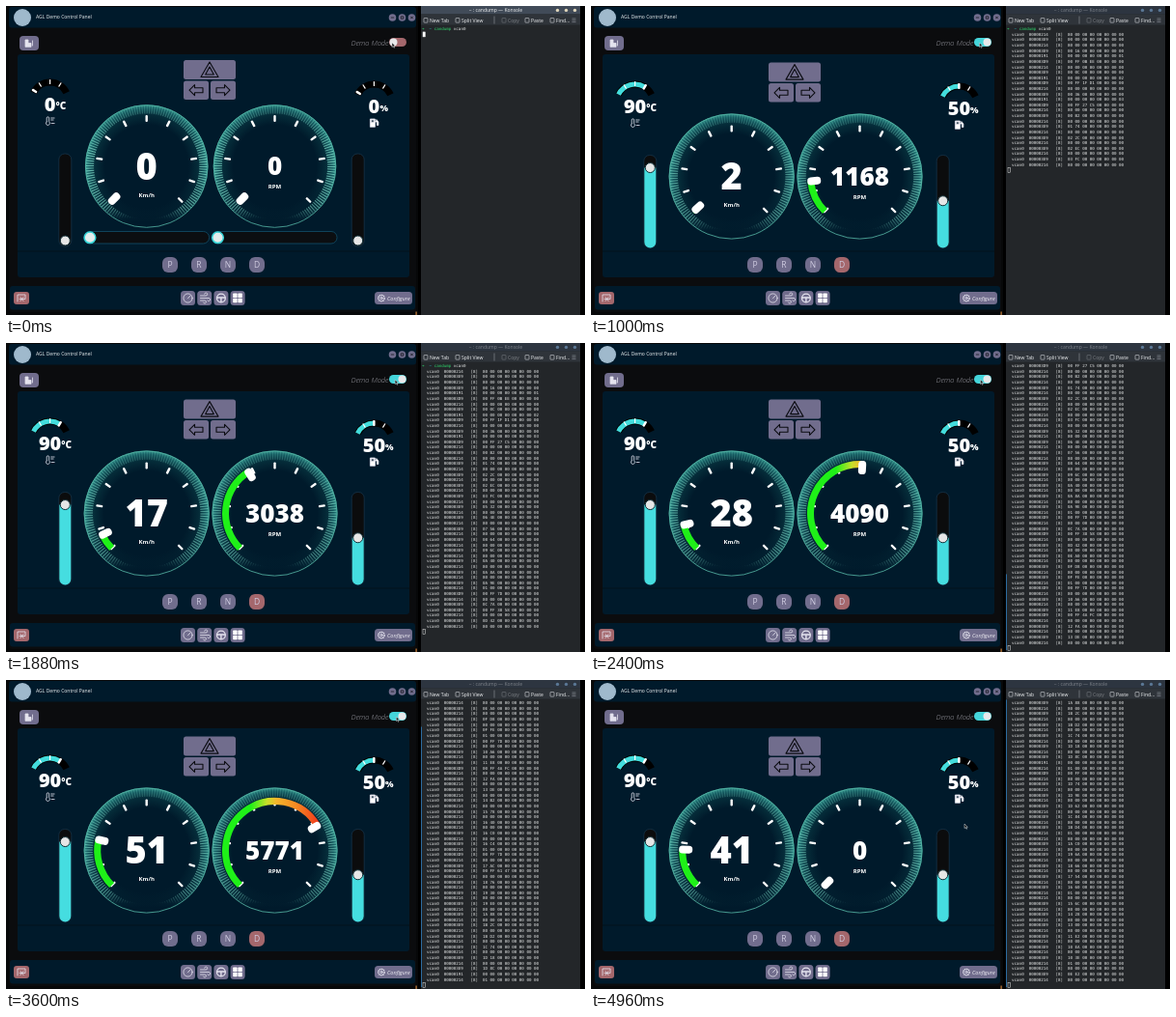
These frames come from a looping animation (600x320 px, 5 s). An HTML page:

```html
<!DOCTYPE html>
<html lang="en">
<head>
<meta charset="utf-8">
<title>Control panel and CAN dump</title>
<style>
html, body { margin: 0; width: 100%; height: 100%; overflow: hidden; background: #000; }
svg { display: block; width: 600px; height: 320px; font-family: "Open Sans", "Noto Sans", sans-serif; }
.btn { fill: #716d8d; }
.red { fill: #a4676c; }
.ink { fill: none; stroke: #0b0c12; stroke-width: 1.1; stroke-linejoin: round; }
.pale { fill: none; stroke: #e4e3ee; stroke-width: .8; stroke-linejoin: round; stroke-linecap: round; }
.num { fill: #fff; font-weight: 800; }
.mid { text-anchor: middle; }
.bar { font: 5px "Noto Sans", sans-serif; fill: #e6e8ea; }
.term { font: 4.2px "DejaVu Sans Mono", monospace; fill: #e4e6e6; white-space: pre; }
</style>
</head>
<body>
<svg id="stage" viewBox="0 0 600 320" xmlns="http://www.w3.org/2000/svg"></svg>
<script>
const LOOP = 5000, STEP = 40, START = 80;
const ROWS = 53, PITCH = 5.615, SWEEP = 270, FROM = 135;
const NAVY = "#001a2b";

// Keyframes: [ms, value], linear in between
const TRACKS = {
  lines: [[40, 0], [1000, 25], [1880, 48], [2400, 65], [3160, 86], [4080, 114], [4960, 138]],
  speed: [[500, 0], [1000, 2], [1400, 7], [1880, 17], [2400, 28], [3160, 43], [3700, 53],
          [4080, 55], [4250, 55], [4450, 52.5], [4960, 41]],
  rpm: [[440, 0], [1000, 1168], [1880, 3038], [2400, 4090], [3160, 5129], [3620, 5800], [4080, 2927], [4600, 0]],
  temp: [[80, 0], [480, 90]],
  fuel: [[80, 0], [480, 50]],
  mouseX: [[0, 400], [320, 402], [4400, 405], [4800, 387]],
  mouseY: [[0, 38], [320, 38], [4400, 38], [4800, 149]]
};

function at(name, t) {
  const k = TRACKS[name];
  if (t <= k[0][0]) return k[0][1];
  for (let i = 1; i < k.length; i++) {
    const [a, u] = k[i - 1], [b, v] = k[i];
    if (t <= b) return u + (v - u) * (t - a) / (b - a);
  }
  return k[k.length - 1][1];
}

// Bus log: plain = speed, g = gear, r = engine speed, x = indicator flag
const LOG = `0000 0016 g01 r0BEE 000C g02 r1FD1 0036 g03 r27C5 00B2 0174 022C 02EC 03FC 0532 064E 0756
  0864 096C 0A40 0A8A 0A9E x r7D00 0C7A r3858 0D42 0EA0 0FD8 0FFE x r7D00 10A6 11E8 r4AFC 12FA 13DE
  14B2 1578 1640 16C0 16C4 x r7D00 17AC r6147 1876 1930 19E0 1A88 1B2C 1BD2 1C74 1D18 1D8C g00 x r0000
  1D74 1D9E 1D62 1C84 1BD4 x 1AC0 196A 1866 1754 1660 x 156C 1428 1300 11E2 10EA 103E x 0EE2`;

function frame(id, hex) {
  return `  vcan0  00000${id}   [8]  ${hex.padEnd(16, "0").match(/../g).join(" ")}`;
}
const log = [];
for (const word of LOG.split(/\s+/)) {
  const rest = word.slice(1);
  if (word === "x") log.push(frame("214", "01"));
  else if (word[0] === "g") log.push(frame("191", rest.padStart(16, "0")));
  else if (word[0] === "r") log.push(frame("3D9", "00FF" + rest));
  else log.push(frame("214", "80"), frame("3E9", word));
}
log.push(frame("214", "80"));

// Markup helpers
const rect = (x, y, w, h, r, attrs) => `<rect x="${x}" y="${y}" width="${w}" height="${h}" rx="${r}" ${attrs}/>`;
const circle = (x, y, r, attrs) => `<circle cx="${x}" cy="${y}" r="${r}" ${attrs}/>`;
const path = (d, attrs) => `<path d="${d}" ${attrs}/>`;
const text = (x, y, s, attrs) => `<text x="${x}" y="${y}" ${attrs}>${s}</text>`;
const group = (attrs, ...kids) => `<g ${attrs}>${kids.join("")}</g>`;
const times = (n, fn) => Array.from({ length: n }, (_, i) => fn(i)).join("");

function arc(r, a, b) {
  const p = d => [r * Math.cos(d * Math.PI / 180), r * Math.sin(d * Math.PI / 180)].map(v => v.toFixed(2)).join(" ");
  return `M${p(a)}A${r} ${r} 0 ${b - a > 180 ? 1 : 0} 1 ${p(b)}`;
}

function dial(id, size, unit, unitY) {
  return group(`id="${id}"`,
    group(`class="ring"`,
      circle(0, 0, 65, `fill="url(#glow)"`),
      circle(0, 0, 65.5, `fill="url(#fade)"`),
      circle(0, 0, 60, `class="teeth" fill="none" stroke="url(#teeth)" stroke-width="8.5" pathLength="360" stroke-dasharray="1 1.5"`),
      circle(0, 0, 64.6, `fill="none" stroke="#58b8a8" stroke-width=".8"`)),
    times(11, i => rect(46, -1.2, 7, 2.4, 1, `fill="#fff" transform="rotate(${FROM + i * SWEEP / 10})"`)),
    path("", `class="arc" fill="none" stroke="url(#heat)" stroke-width="7"`),
    rect(40.5, -4, 14, 8, 3.6, `class="hand" fill="#fff"`),
    text(0, size * .36, "0", `class="num mid val" font-size="${size}"`),
    text(0, unitY, unit, `class="num mid" font-size="6" style="font-weight:700"`));
}

function gauge(id, unit, unitSize, icon) {
  return group(`id="${id}"`,
    path(arc(19, 206, 334), `fill="none" stroke="#000" stroke-width="7"`),
    path("", `class="arc" fill="none" stroke="#43dcdc" stroke-width="5"`),
    times(3, i => rect(17, -.6, 5, 1.2, .5, `fill="#fff" transform="rotate(${238 + i * 32})"`)),
    rect(16, -1.2, 6, 2.4, 1, `class="hand" fill="#fff"`),
    text(0, 11, "0", `class="num mid val" font-size="20"`),
    text(0, 8.6, unit, `class="num unit" font-size="${unitSize}"`),
    path(icon, `class="pale" transform="translate(0,21)"`));
}

const vertical = (id, x) => group(`id="${id}"`,
  rect(x - 6.5, 0, 13, 96, 6, `fill="#0b0c0d" stroke="#17344a" stroke-width=".8"`),
  path("", `class="fill" fill="#45dde0"`),
  circle(x, 0, 5, `class="knob" fill="#e6e6e6" stroke="#123038" stroke-width="1"`));

const horizontal = x => rect(x, 233.5, 130, 12.5, 6, `fill="#0b0e11" stroke="#12506a" stroke-width=".8"`) +
  circle(x + 6.5, 239.8, 5.8, `fill="#e2ecec" stroke="#35d5d8" stroke-width="1.5"`);

const gear = (c, i) => rect(162 + i * 30, 260, 16, 16, 6, `class="btn" id="gear${c}"`) +
  text(170 + i * 30, 271, c, `class="mid" font-size="8.5" fill="#cfcbe0"`);

const ARROW = "M-7 0L-1.5-5.5V-2.5H7V2.5H-1.5V5.5Z";
const SEAT = "M-4 3.5V-3.5H-1V0H2V3.5ZM3.5-2.5V2.5";
const THERMO = "M-3.4 .8V-3A1.2 1.2 0 0 1-1 -3V.8A2 2 0 1 1-3.4 .8M1-3H4.5M1-1H3.5M1.5 2.5H4.5";
const PUMP = "M-4 4V-4H1V4ZM-2.8-2.8V-.8H-.2V-2.8ZM1-1H3V2.5H4.5V-1L2.5-3.5";

const defs = `<defs>
  <radialGradient id="glow"><stop offset=".68" stop-color="${NAVY}"/><stop offset=".84" stop-color="#052c39"/>
    <stop offset=".94" stop-color="#145a60"/><stop offset="1" stop-color="#2f8f88"/></radialGradient>
  <linearGradient id="fade" x2="0" y2="1"><stop offset=".55" stop-color="${NAVY}" stop-opacity="0"/>
    <stop offset=".95" stop-color="${NAVY}"/></linearGradient>
  <linearGradient id="teeth" x2="0" y2="1"><stop stop-color="#7fdcc8" stop-opacity=".35"/>
    <stop offset=".4" stop-color="#7fdcc8"/><stop offset=".86" stop-color="#7fdcc8" stop-opacity=".8"/>
    <stop offset=".96" stop-color="#7fdcc8" stop-opacity="0"/></linearGradient>
  <linearGradient id="heat" gradientUnits="userSpaceOnUse" x1="-50" x2="50"><stop offset=".25" stop-color="#1ff018"/>
    <stop offset=".42" stop-color="#c8e02a"/><stop offset=".52" stop-color="#f5b52c"/>
    <stop offset=".72" stop-color="#f58a22"/><stop offset="1" stop-color="#f02a1a"/></linearGradient>
</defs>`;

const app = [
  rect(0, 0, 427, 320, 0, `fill="#070809"`),
  rect(3, 1, 422, 316, 3, `fill="#0b0c0e"`),
  rect(3, 1, 422, 21.5, 3, `fill="${NAVY}"`),
  circle(17, 12, 9, `fill="#9fb9cc"`),
  text(31, 13.4, "AGL Demo Control Panel", `class="bar"`),
  times(3, i => circle(400.5 + i * 10, 12, 3.8, `class="btn"`)),
  path("M398.8 12H402.2M409.3 10.8H411.8V13.2H409.3ZM419.3 10.8L421.7 13.2M421.7 10.8L419.3 13.2", `class="ink" style="stroke-width:.7"`),
  rect(14, 31, 20, 15, 4, `class="btn"`),
  path(SEAT, `class="pale" style="fill:#e4e3ee" transform="translate(24,38.5)"`),
  text(396.5, 40.6, "Demo Mode", `text-anchor="end" font-size="7.6" font-style="italic" font-weight="300" fill="#9a9aa2"`),
  rect(397, 33, 18, 9, 4.5, `id="track"`),
  circle(0, 37.5, 4, `id="thumb" fill="#e8e8ea"`),
  rect(12, 50, 406, 231, 3, `fill="${NAVY}"`),
  path("M12 254H418", `stroke="#031019" stroke-width=".8"`),
  group(`id="signals"`,
    rect(184, 56, 54, 20, 2.5, `class="btn"`),
    path("M211 58L220 73.5H202ZM211 63L215.3 71H206.7Z", `class="ink"`),
    rect(184, 77.5, 26, 19.5, 2.5, `class="btn"`), rect(212, 77.5, 26, 19.5, 2.5, `class="btn"`),
    path(ARROW, `class="ink" transform="translate(197,87.2)"`),
    path(ARROW, `class="ink" transform="translate(225,87.2) scale(-1,1)"`)),
  gauge("temp", "°C", 10, THERMO), gauge("fuel", "%", 9, PUMP),
  vertical("heat-bar", 61.3), vertical("fuel-bar", 364.7),
  dial("speed", 38, "Km/h", 31.5), dial("rpm", 26, "RPM", 23),
  group(`id="manual"`, horizontal(80.5), horizontal(213)),
  [..."PRND"].map(gear).join(""),
  rect(4, 290, 420, 24.5, 3, `fill="${NAVY}"`),
  rect(8, 296, 16, 13, 3, `class="red"`),
  path("M-4 3.5V-3.5H4V1H-2M-1-1L2 3M2-1L-1 3", `class="pale" transform="translate(16,302.5)"`),
  times(4, i => rect(181 + i * 17.2, 295, 15, 15, 3.5, `class="btn"`)),
  circle(188.5, 302.5, 4.6, `class="pale"`), path("M188.5 302.8L191 300", `class="pale"`),
  path("M201.5 300H207A1.5 1.5 0 1 0 205.7 298.2M201.5 302.5H210A1.5 1.5 0 1 1 208.8 304.8M201.5 305H205.5A1.5 1.5 0 1 1 204.5 307", `class="pale"`),
  circle(222.9, 302.5, 4.4, `class="pale" style="stroke-width:1.3"`), path("M218.8 302H227M222.9 302.5V306.5", `class="pale" style="stroke-width:1.4"`),
  times(4, i => rect(235.2 + (i % 2) * 5.2, 297.6 + (i >> 1) * 5.2, 4.4, 4.4, .6, `fill="#fff"`)),
  rect(382, 296, 39, 13, 3.5, `class="btn"`),
  circle(389, 302.5, 3.2, `class="pale" stroke-dasharray="1.6 .5" style="stroke-width:1.3;stroke-linecap:butt"`), circle(389, 302.5, 1.2, `class="pale"`),
  text(395, 304.7, "Configure", `font-size="5.6" font-style="italic" fill="#f0eff5"`),
  rect(424.5, 316.5, 1.2, 3.5, 0, `fill="#c9803c"`)
];

const tool = (x, s, dim) => group(dim ? `opacity=".4"` : "",
  rect(x - 6, 12.5, 4, 4.6, .5, `fill="none" stroke="#d0d4d8" stroke-width=".6"`), text(x, 16.7, s, `class="bar"`));

const term = [
  rect(430, 0, 165, 320, 0, `fill="#232629"`),
  rect(430, 0, 165, 8.5, 0, `id="head"`),
  text(507.5, 6.2, "~ : candump — Konsole", `id="caption" class="bar mid"`),
  times(3, i => circle(571.5 + i * 9, 4.4, 1.7, `class="dot"`)),
  rect(430, 8.5, 165, 11, 0, `fill="#2f343a"`),
  tool(439, "New Tab"), tool(472, "Split View"), tool(520, "Copy", true), tool(544, "Paste"), tool(570, "Find..."),
  path("M506 10.5V18.5M586.5 13H590.5M586.5 14.8H590.5M586.5 16.6H590.5", `stroke="#9298a0" stroke-width=".6"`),
  times(ROWS, i => text(431, (25.2 + i * PITCH).toFixed(2), "", `class="term line"`)),
  rect(432, 0, 2.4, 5, 0, `id="caret" stroke="#e8e8e8" stroke-width=".5"`),
  rect(430, 0, 1, 0, 0, `id="fresh" fill="#2c6ca0"`)
];

const mouse = path("M0 0V4.6L1.1 3.6L2 5.4L2.7 5L1.9 3.3H3.3Z", `id="mouse" fill="#111" stroke="#dfe6ea" stroke-width=".5"`);

const stage = document.getElementById("stage");
stage.innerHTML = defs + app.join("") + term.join("") + mouse;

const $ = id => document.getElementById(id);
const set = (el, attrs) => { for (const k in attrs) el.setAttribute(k, attrs[k]); };
const part = (id, name) => $(id).querySelector("." + name);
const lineEls = [...stage.querySelectorAll(".line")];
const PROMPT = `<tspan fill="#2fd66b">➜</tspan>  <tspan fill="#2fb8c8">~</tspan> <tspan fill="#2fd66b">candump</tspan> vcan0`;
set(part("fuel", "pale"), { style: "fill:#fff;fill-rule:evenodd" });

function drawDial(id, cx, on, value, max) {
  const angle = FROM + SWEEP * value / max;
  set($(id), { transform: `translate(${cx},${on ? 176.5 : 166})` });
  set(part(id, "ring"), { transform: `scale(${on ? 1 : .98})` });
  set(part(id, "teeth"), { opacity: on ? .65 : .8 });
  set(part(id, "arc"), { d: value > 0 ? arc(51, FROM, angle) : "" });
  set(part(id, "hand"), { transform: `rotate(${angle})` });
  part(id, "val").textContent = Math.round(value);
}

function drawGauge(id, x, y, value, share) {
  const angle = 206 + 128 * share, label = String(Math.round(value));
  set($(id), { transform: `translate(${x},${y})` });
  set(part(id, "arc"), { d: value > 0 ? arc(19, 206, angle) : "" });
  set(part(id, "hand"), { transform: `rotate(${Math.max(angle, 212)})` });
  set(part(id, "unit"), { x: label.length * 5.7 + .3 });
  part(id, "val").textContent = label;
}

function drawBar(id, x, on, value) {
  const y = 90 - value * .855;
  set($(id), { transform: `translate(0,${on ? 154.5 : 153})` });
  set(part(id, "knob"), { cy: y });
  set(part(id, "fill"), { d: value > 0 ? `M${x - 6} ${y}H${x + 6}V90a6 6 0 0 1-12 0Z` : "" });
}

let shown = -1;
function drawTerm(count, on) {
  if (count !== shown) {
    const top = Math.max(0, count + 2 - ROWS);
    lineEls.forEach((el, i) => {
      const n = top + i;
      if (n === 0) el.innerHTML = PROMPT;
      else el.textContent = n <= count ? log[n - 1] : "";
    });
    set($("caret"), { y: (21.3 + (count + 1 - top) * PITCH).toFixed(2) });
    // Marks the lines scrolled into view
    const h = Math.min(top, ROWS) * PITCH;
    set($("fresh"), { y: 318 - h, height: h });
    shown = count;
  }
  set($("caret"), { fill: on ? "none" : "#fff" });
  set($("head"), { fill: on ? "#2d3540" : "#414b58" });
  set($("caption"), { opacity: on ? .4 : 1 });
  for (const dot of stage.querySelectorAll(".dot")) set(dot, { fill: on ? "#5b7896" : "#e2d8bc" });
}

function draw(t) {
  const on = t >= START;
  const temp = at("temp", t), fuel = at("fuel", t);
  set($("track"), { fill: on ? "#45d5da" : "#a4676c" });
  set($("thumb"), { cx: on ? 410.5 : 401.5 });
  set($("signals"), { transform: `translate(0,${on ? 2.6 : 0})` });
  set($("manual"), { opacity: on ? 0 : 1 });
  set($("gearD"), { class: on ? "red" : "btn" });
  drawDial("speed", 145.7, on, at("speed", t), 240);
  drawDial("rpm", 278.5, on, at("rpm", t), 8000);
  drawGauge("temp", 45.6, on ? 100 : 98, temp, temp / 120);
  drawGauge("fuel", 381.4, on ? 102 : 100, fuel, fuel / 100);
  drawBar("heat-bar", 61.3, on, temp);
  drawBar("fuel-bar", 364.7, on, fuel);
  drawTerm(Math.floor(at("lines", t) + 1e-6), on);
  set($("mouse"), { transform: `translate(${at("mouseX", t)},${at("mouseY", t)})` });
}

const begin = performance.now();
function tick(now) {
  const t = Math.max(0, now - begin) % LOOP;
  draw(Math.floor(t / STEP) * STEP);
  requestAnimationFrame(tick);
}
draw(0);
requestAnimationFrame(tick);
</script>
</body>
</html>
```
